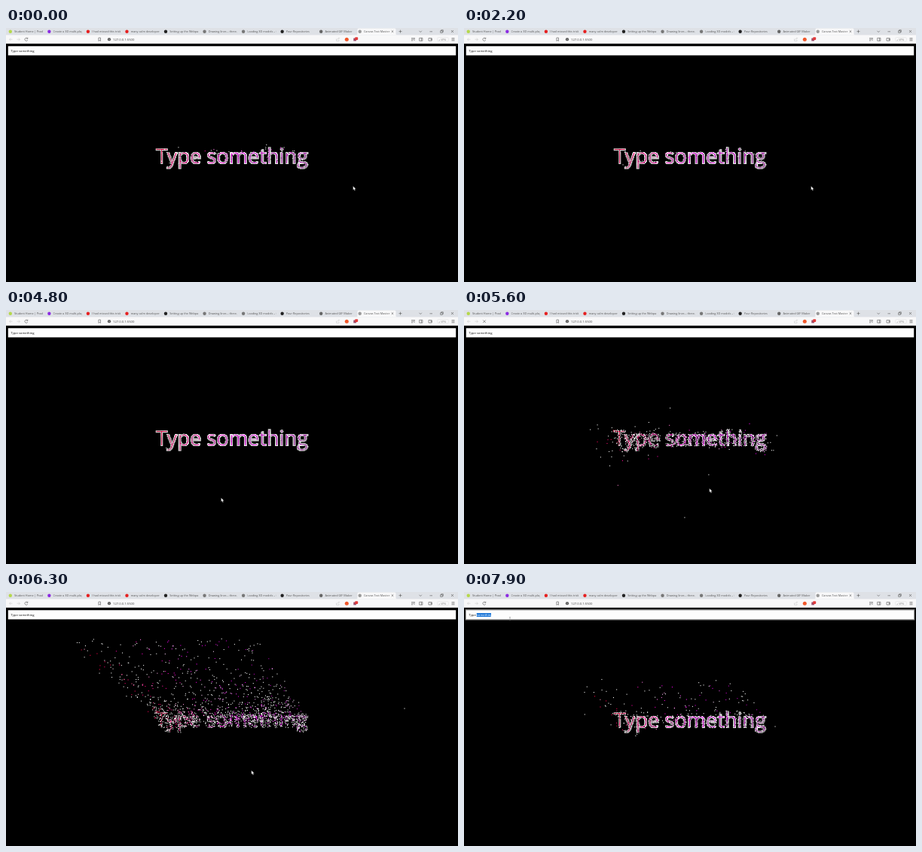
Write an HTML page with a canvas that moves like this. It is 600 px wide and 338 px high and loops after 8000 ms.

```html
<!DOCTYPE html>
<html lang="en">
<head>
<meta charset="utf-8">
<title>Text particles</title>
<style>
  html, body { margin: 0; width: 100%; height: 100%; overflow: hidden; background: #000; }
  canvas, svg { position: absolute; left: 0; top: 0; width: 600px; height: 338px; display: block; }
  text { font: 4.2px "Open Sans", "Noto Sans", sans-serif; fill: #444; }
  #tabs text { font-size: 3.8px; fill: #555; }
  .line { fill: none; stroke: #555; stroke-width: .6; }
  .dim { stroke: #c8c8c8; }
</style>
</head>
<body>
<canvas id="stage" width="600" height="338"></canvas>
<svg viewBox="0 0 600 338">
  <rect width="600" height="10" fill="#dee1e6"/>
  <rect y="9.4" width="600" height="11.4" fill="#f8f8f9"/>
  <path d="M465 9.6q1.5 0 1.5-2V2q0-1.5 1.5-1.5h48q1.5 0 1.5 1.5v5.6q0 2 1.5 2z" fill="#f8f8f9"/>
  <g id="tabs"></g>
  <path class="line" d="M511.700 3.300l2.600 2.600m0-2.600l-2.600 2.600M521.500 4.600h4m-2-2v4M548.500 3.800l1.700 1.700 1.700-1.700M562.500 4.800h3.500M576.700 3.700h2.600v2.600h-2.600zM577.700 3.700v-1h2.600v2.600h-1M591 3l3 3m0-3l-3 3"/>
  <path class="line dim" d="M8.500 15.200h-4m1.700-1.700l-1.700 1.700 1.700 1.700M14.500 15.200h4m-1.700-1.700l1.700 1.700-1.700 1.700"/>
  <path id="reload" class="line" d="M28.600 14a2 2 0 1 0 .2 2M28.800 12.700v1.600h-1.600"/>
  <path id="stop" class="line" d="M25.200 13.400l3.600 3.600m0-3.600l-3.600 3.600"/>
  <path class="line" d="M122.900 13h2.600v4.300l-1.300-1-1.300 1z"/>
  <circle cx="137" cy="15.200" r="2.100" fill="#555"/>
  <path d="M137 14.900v1.300M137 13.700v.6" stroke="#fff" stroke-width=".6"/>
  <text x="142" y="16.700">127.0.0.1:5500</text>
  <path class="line dim" d="M438.500 14.500v2.700h3.500v-1.500M439.800 15.600q.2-2 2.700-2m-1-1l1 1-1 1"/>
  <circle cx="452.300" cy="15.200" r="2.500" fill="#f0582b"/>
  <rect x="461.300" y="13.500" width="3.600" height="3.800" fill="#9a4b69"/>
  <rect x="463.200" y="12.300" width="4" height="3.600" rx=".8" fill="#e23b3b"/>
  <path class="line" d="M538 13.600h5M538 15.200h3M538 16.800h2M542 14v3M548.700 13.300h4.200v3.800h-4.200zM551.400 13.300v3.800M561 13.500h4.200v3.500H561zM563.600 14.800h1.600v1h-1.600M591.500 13.600h4M591.500 15.200h4M591.500 16.800h4"/>
  <rect x="572.500" y="12.500" width="15" height="5.400" rx="2" fill="none" stroke="#ddd" stroke-width=".5"/>
  <text x="574.500" y="16.500" style="font-size:3.500px;fill:#888">▵ VPN</text>

  <rect id="ring" x="2.400" y="23.600" width="595.200" height="13.300" fill="none" stroke="#858585" stroke-width="1.200"/>
  <rect x="2.800" y="24.200" width="594.400" height="12.200" fill="#fdfdfd"/>
  <rect id="mark" x="16.800" y="28" width="19.200" height="5" fill="#1f78d8"/>
  <text x="6.500" y="31.800" style="fill:#111">Type <tspan id="word">something</tspan></text>
  <path id="arrow" d="M0 0v5l1.200-1 .8 2 .9-.4-.8-1.900h1.600z" fill="#fff" stroke="#333" stroke-width=".25"/>
  <path id="beam" d="M-.8-2h1.600M0-2v4M-.8 2h1.600" stroke="#777" stroke-width=".5"/>
</svg>
<script>
const LOOP = 8000, RELOAD = 5850, TOP = 37;
const ctx = document.getElementById('stage').getContext('2d');
const el = id => document.getElementById(id);
const show = (id, on) => el(id).setAttribute('visibility', on ? 'visible' : 'hidden');

const tabs = [
  ['#b5d84b', 'Student Home | Prado'], ['#8b2be2', 'Create a 3D multi-playe'],
  ['#e62020', 'I had missed this trick'], ['#e62020', 'many calm developers'],
  ['#222', 'Setting up the Webpac'], ['#777', 'Drawing lines – three.js'],
  ['#777', 'Loading 3D models – t'], ['#222', 'Your Repositories'],
  ['#666', 'Animated GIF Maker'], ['#999', 'Canvas Text Master']
];
el('tabs').innerHTML = tabs.map(([color, label], i) => {
  const x = 3.5 + i * 51.55;
  return `<circle cx="${x + 2.3}" cy="4.700" r="2.200" fill="${color}"/>
    <svg x="${x + 7.5}" y="0" width="38" height="9" style="position:static;width:38px;height:9px">
    <text y="6.100">${label}</text></svg>`;
}).join('');

let seed = 71;
function random() {
  seed = (seed + 0x6D2B79F5) | 0;
  let n = Math.imul(seed ^ seed >>> 15, 1 | seed);
  n = n + Math.imul(n ^ n >>> 7, 61 | n) ^ n;
  return ((n ^ n >>> 14) >>> 0) / 4294967296;
}

// Draw the words large, then pick one particle per grid cell.
function makeParticles() {
  const scale = 3.2, gap = 3, list = [];
  const big = document.createElement('canvas');
  big.width = 1920;
  big.height = 1082;
  const c = big.getContext('2d', { willReadFrequently: true });
  c.scale(scale, scale);
  const fill = c.createLinearGradient(0, TOP, 600, 338);
  fill.addColorStop(.3, 'red');
  fill.addColorStop(.5, 'fuchsia');
  fill.addColorStop(.7, 'purple');
  c.font = '27.2px "Open Sans", "Noto Sans", sans-serif';
  c.textAlign = 'center';
  c.fillStyle = fill;
  c.strokeStyle = '#fff';
  c.lineWidth = 1.15;
  c.fillText('Type something', 299.8, 180);
  c.strokeText('Type something', 299.8, 180);
  const { data } = c.getImageData(0, 0, big.width, big.height);
  for (let y = 0; y < big.height; y += gap) {
    for (let x = 0; x < big.width; x += gap) {
      const i = (y * big.width + x) * 4;
      if (data[i + 3] < 20) continue;
      const ox = x / scale, oy = y / scale;
      list.push({
        x: ox, y: oy,
        color: `rgb(${data[i]},${data[i + 1]},${data[i + 2]})`,
        startX: 48 + (ox - 200) * 1.3 + (random() - .5) * 36,
        rate: .47 + random() * 15,
        kick: .03 + random() ** 9,
        turn: (random() - .5) * .9
      });
    }
  }
  return list;
}
const particles = makeParticles();

const lerp = (a, b, u) => a + (b - a) * u;

// keys: [time, x, y]
function along(keys, t) {
  let i = 0;
  while (i < keys.length - 2 && t > keys[i + 1][0]) i++;
  const [t0, x0, y0] = keys[i], [t1, x1, y1] = keys[i + 1];
  let u = Math.min(1, Math.max(0, (t - t0) / (t1 - t0)));
  u = u * u * (3 - 2 * u);
  return [lerp(x0, x1, u), lerp(y0, y1, u)];
}

const pointer = [
  [4100, 460.7, 210.5], [4450, 396, 229], [4900, 270, 253], [5350, 252, 174],
  [5580, 325.8, 237.5], [6400, 325.8, 237.5], [7050, 58.6, 40.3], [7450, 58.6, 40.3], [7600, 61, 35.5]
];
const stray = [[5950, 470, 130], [6300, 529, 155], [7100, 586, 177], [7900, 413, 179]];

// Radial shove by the passing pointer, fading as the particle eases home.
function shove(p, t, at, cx, cy) {
  const s = (t - at) / 1000;
  if (s <= 0) return [0, 0];
  const dx = p.x - cx, dy = p.y - cy;
  const size = 9000 * p.kick / (Math.hypot(dx, dy) + 50) * (1 - Math.exp(-18 * s)) * Math.exp(-p.rate * s);
  const angle = Math.atan2(dy, dx) + p.turn;
  return [Math.cos(angle) * size, Math.sin(angle) * size];
}

function draw(t) {
  const fresh = t >= RELOAD;
  const age = (t - (fresh ? RELOAD : -6000)) / 1000;
  const push = fresh ? [6720, 232, 170] : [5330, 252, 172];
  ctx.fillStyle = '#000';
  ctx.fillRect(0, 0, 600, 338);
  for (const p of particles) {
    const left = Math.exp(-p.rate * age);
    const [dx, dy] = shove(p, t, ...push);
    ctx.fillStyle = p.color;
    ctx.fillRect(lerp(p.x, p.startX, left) + dx, lerp(p.y, TOP, left) + dy, 1.05, 1.05);
  }
  if (t >= 5950) {
    const [x, y] = along(stray, t);
    ctx.fillStyle = '#fff';
    ctx.fillRect(x - .5, y - .5, 1.05, 1.05);
  }

  const [px, py] = along(pointer, t);
  const typing = t >= 7550, loading = t >= 5520 && t < RELOAD;
  for (const id of ['arrow', 'beam']) el(id).setAttribute('transform', `translate(${px} ${py})`);
  show('arrow', !typing);
  show('beam', typing);
  show('ring', t >= 7600);
  show('mark', t >= 7700);
  el('word').style.fill = t >= 7700 ? '#fff' : '#111';
  show('stop', loading);
  show('reload', !loading);
}

const begin = performance.now();
function tick() {
  draw((performance.now() - begin) % LOOP);
  requestAnimationFrame(tick);
}
tick();
</script>
</body>
</html>
```
